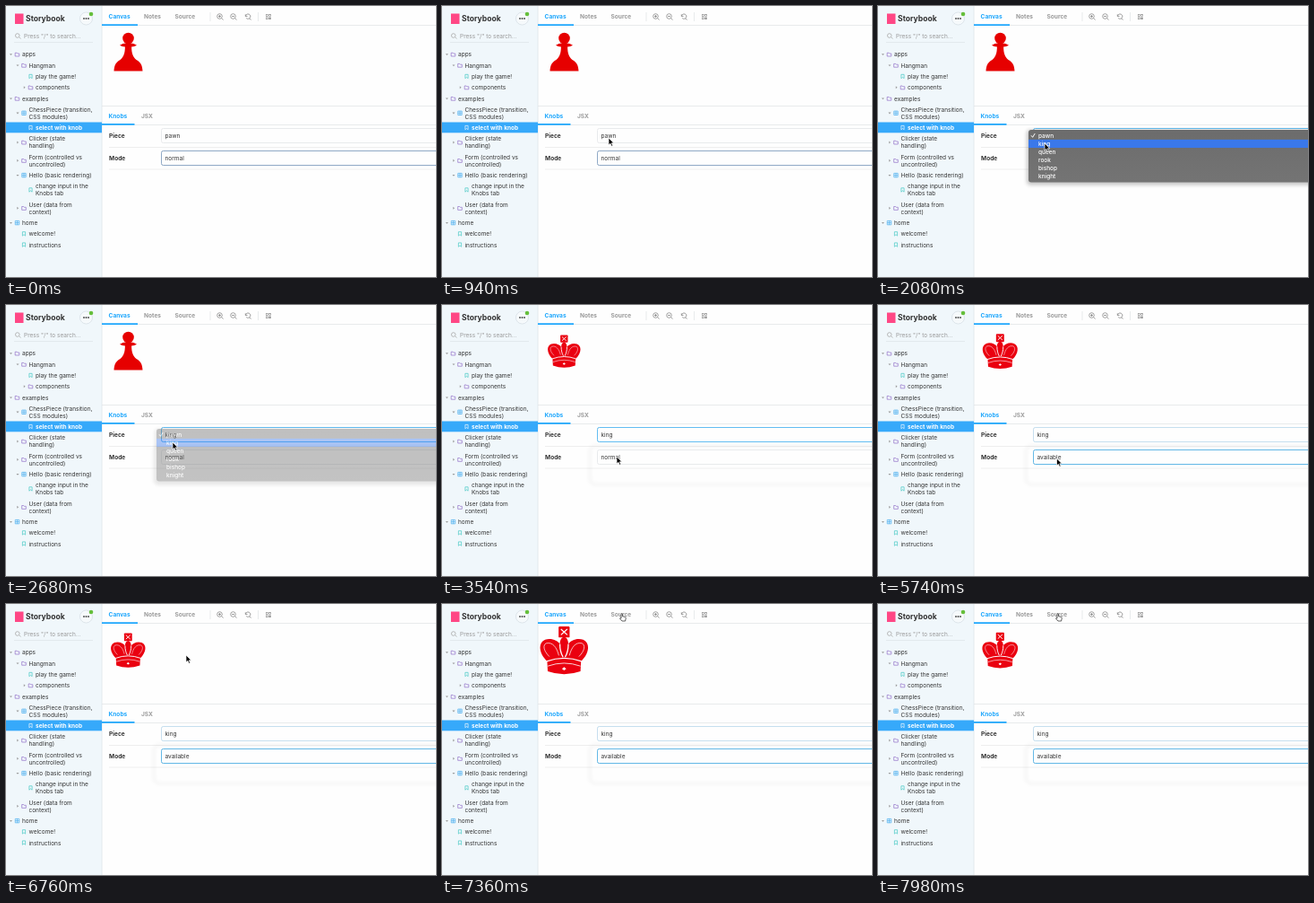
These frames come from a looping animation (480 by 302 pixels, 8 s). An HTML page:

```html
<!DOCTYPE html>
<html lang="en">
<head>
<meta charset="utf-8">
<title>Component explorer</title>
<style>
  html, body { margin: 0; width: 100%; height: 100%; overflow: hidden; background: #fefefe; }
  svg { display: block; width: 480px; height: 302px; font: 6.6px Inter, sans-serif; fill: #333; }
  .b { font-weight: 700; }
  .line { fill: none; stroke-width: .8; }
  .tab { fill: #999; font-weight: 700; }
  .on { fill: #1ea7fd; }
  .field { fill: none; stroke-width: 1; }
  .menu { font-size: 6.5px; font-weight: 500; fill: #fff; }
  #tree { font-size: 6.5px; }
</style>
</head>
<body>
<svg id="stage" viewBox="0 0 480 302">
  <defs>
    <filter id="blur" x="-10%" y="-40%" width="120%" height="180%"><feGaussianBlur stdDeviation="2"/></filter>
    <linearGradient id="dark" x2="0" y2="1"><stop stop-color="#6c6c6c"/><stop offset="1" stop-color="#747474"/></linearGradient>
  </defs>

  <rect width="107" height="302" fill="#f0f7fb"/>
  <path class="line" stroke="#dde5ea" d="M107 0V302"/>
  <rect x="10" y="8.5" width="9.5" height="11.5" fill="#ff4785"/>
  <text class="b" x="22" y="17" font-size="8.6">Storybook</text>
  <circle cx="89.5" cy="14" r="7" fill="#f6fafc" stroke="#d3dce2" stroke-width=".7"/>
  <g fill="#444"><circle cx="87" cy="14" r=".9"/><circle cx="89.5" cy="14" r=".9"/><circle cx="92" cy="14" r=".9"/></g>
  <circle cx="95" cy="9" r="2.3" fill="#66bf3c"/>
  <path class="line" stroke="#aaa" d="M14.8 34.8l1.7 1.7M15.1 33a2.3 2.3 0 1 1-4.6 0a2.3 2.3 0 1 1 4.6 0"/>
  <text x="20" y="36" font-size="6.5" fill="#999">Press "/" to search...</text>
  <path class="line" stroke="#dfe6ea" d="M9 40.5H97"/>
  <rect y="129.500" width="107" height="11.800" fill="#36a9fa"/>
  <g id="tree"></g>

  <path class="line" stroke="#e3e6e8" d="M107 21.5H480M107 111.5H480M107 132.5H480M228 7V17M281.500 7V17"/>
  <path fill="#1ea7fd" d="M107 20.300h40v1.700h-40zM107 131h36.500v1.700h-36.500z"/>
  <text class="tab on" x="114.500" y="14.400">Canvas</text>
  <text class="tab" x="154" y="14.400">Notes</text>
  <text class="tab" x="188.500" y="14.400">Source</text>
  <text class="tab on" x="114.500" y="124.900">Knobs</text>
  <text class="tab" x="151" y="124.900">JSX</text>
  <g id="tools" class="line" stroke="#888"></g>

  <path class="line" stroke="#eaeaea" d="M115 157.500H480M115 182H480"/>
  <text class="b" x="115" y="147.300">Piece</text>
  <text class="b" x="115" y="172.300">Mode</text>
  <g class="field" stroke="#e8eaec">
    <rect x="173.500" y="136.500" width="330" height="16" rx="2"/>
    <rect x="173.500" y="161.500" width="330" height="16" rx="2"/>
  </g>
  <rect id="pieceRing" class="field" stroke="#62bdf2" x="173.500" y="136.500" width="330" height="16" rx="2"/>
  <rect id="modeRing" class="field" x="173.500" y="161.500" width="330" height="16" rx="2"/>
  <text id="pieceValue" x="177.500" y="147.300" font-size="6.500"></text>
  <text id="modeValue" x="177.500" y="172.300" font-size="6.500"></text>
  <rect id="shade" class="line" stroke="#000" style="stroke-width:3" x="165" y="157" width="340" height="43" rx="6" filter="url(#blur)"/>

  <g id="pawn" fill="#e60000" transform="translate(136.500 51.500)">
    <circle cy="-15.500" r="6.300"/>
    <path d="M-9.500-7.800Q-6-10-3-10H3Q6-10 9.500-7.800Q7-6 3.600-6C3.700 1 5 5 9 8.500C14 11.500 15.500 14 16 21H-16C-15.500 14-14 11.500-9 8.500C-5 5-3.700 1-3.600-6Q-7-6-9.500-7.800Z"/>
  </g>
  <g id="king" fill="#ea0010">
    <rect x="-5.200" y="-22.500" width="10.400" height="10.500" rx="1"/>
    <path d="M-16 10.500C-24 3-25-7-18-10C-12-12-6-9-4-6C-4-10-2-12.500 0-12.500S4-10 4-6C6-9 12-12 18-10C25-7 24 3 16 10.500L15.500 20Q0 25.500 -15.500 20Z"/>
    <g class="line" stroke="#fff" style="stroke-width:1.100">
      <path d="M-3-20L3-14.500M3-20L-3-14.500"/>
      <path d="M-4-6C-4-1-3 3-1 6.500M4-6C4-1 3 3 1 6.500M-16.500 10.500Q0 4.500 16.500 10.500"/>
      <path d="M-15.500 15Q0 9.500 15.500 15" style="stroke-width:.7"/>
      <path d="M-14 6C-20 0-20-5-17-6.500C-11-8-7-3-5 5M14 6C20 0 20-5 17-6.500C11-8 7-3 5 5" style="stroke-width:.6"/>
    </g>
    <path fill="#fff" d="M-2 17.500L0 16L2 17.500L0 19Z"/>
  </g>

  <g id="pieceMenu" class="menu"></g>
  <g id="modeMenu" class="menu"></g>

  <g id="cursor" stroke="#fff" stroke-width=".7" fill="#000">
    <path id="arrow" d="M0 0V8L1.900 6.300L3.200 9.200L4.600 8.600L3.300 5.800H5.800Z"/>
    <path id="hand" fill="#fff" stroke="#222" d="M1 4.500V.700Q1.800-.300 2.500 .700V3.200L5.600 4Q6.400 4.500 6.200 5.500L5.600 8.500H2L-.600 5.500Q-.300 4.300 1 5.500Z"/>
  </g>
</svg>

<script>
const $ = id => document.getElementById(id);

// Sidebar: [y, indent level, icon, arrow, lines]
const icons = {
  folder: ['#8a63c4', 'M-2.3-1.8H-.4L.3-1H2.300V2H-2.300Z'],
  part: ['#38a8ee', 'M-2.200-2.200H2.200V2.200H-2.200ZM0-2.200V2.200M-2.200 0H2.200'],
  story: ['#37c5c0', 'M-1.600-2.200H1.600V2.200L0 .800L-1.600 2.200Z']
};
const arrows = { open: 'M-1.500-.700H1.500L0 1.100Z', shut: 'M-.700-1.500V1.500L1.100 0Z', none: '' };
const rows = [
  [54, 0, 'folder', 'open', ['apps']],
  [66.2, 1, 'folder', 'open', ['Hangman']],
  [78.5, 2, 'story', 'none', ['play the game!']],
  [90.8, 2, 'folder', 'shut', ['components']],
  [103.2, 0, 'folder', 'open', ['examples']],
  [119.3, 1, 'part', 'open', ['ChessPiece (transition,', 'CSS modules)']],
  [135.6, 2, 'story', 'none', ['select with knob']],
  [152, 1, 'folder', 'shut', ['Clicker (state', 'handling)']],
  [172.3, 1, 'folder', 'shut', ['Form (controlled vs', 'uncontrolled)']],
  [188.6, 1, 'part', 'open', ['Hello (basic rendering)']],
  [205, 2, 'story', 'none', ['change input in the', 'Knobs tab']],
  [225.3, 1, 'folder', 'shut', ['User (data from', 'context)']],
  [241.6, 0, 'part', 'open', ['home']],
  [253.9, 1, 'story', 'none', ['welcome!']],
  [266.1, 1, 'story', 'none', ['instructions']]
];
$('tree').innerHTML = rows.map(([y, level, icon, arrow, lines]) => {
  const x = 18 + level * 7.5, chosen = lines[0].startsWith('select');
  const [color, shape] = icons[icon];
  const text = lines.map((s, i) =>
    `<text x="${x}" y="${y + 2.4 + (i - (lines.length - 1) / 2) * 8}" ${chosen ? 'class="b" fill="#fff"' : ''}>${s}</text>`).join('');
  return `<path class="line" stroke="${chosen ? '#fff' : color}" style="stroke-width:.65" transform="translate(${x - 5.500} ${y})" d="${shape}"/>
    <path fill="#999" transform="translate(${x - 12.500} ${y})" d="${arrows[arrow]}"/>${text}`;
}).join('');

const lens = (x, sign) => `<circle cx="${x}" cy="11.500" r="2.800"/><path d="M${x + 2} 13.500l2 2${sign}"/>`;
$('tools').innerHTML =
  lens(238.500, 'M237 11.500h3m-1.500-1.500v3') + lens(253.500, 'M252 11.500h3') +
  '<path d="M267.300 9.300v2.200h2.200M267.500 11.200a2.700 2.700 0 1 1 .700 2.300M271.500 13.500l2 2"/>' +
  [290.5, 293.8].map(x => [9.5, 12.8].map(y => `<rect x="${x}" y="${y}" width="1.900" height="1.900" stroke-width=".6"/>`).join('')).join('');

function buildMenu(id, top, height, items) {
  const mid = i => top + 6.300 + i * 9.150;
  $(id).innerHTML = `
    <rect x="166" y="${top}" width="340" height="${height + 3}" rx="4" fill="#000" opacity=".22" filter="url(#blur)"/>
    <rect x="168" y="${top}" width="340" height="${height}" rx="3" fill="url(#dark)"/>
    <rect class="mark" x="168" width="340" height="9.200" fill="#3a78ea"/>
    <path class="line" stroke="#fff" style="stroke-width:1" d="M171 ${mid(0)}l1.600 2l2.600-4.200"/>` +
    items.map((s, i) => `<text x="179" y="${mid(i) + 2.200}">${s}</text>`).join('');
  const mark = $(id).querySelector('.mark');
  return (opacity, index) => {
    $(id).setAttribute('opacity', opacity);
    mark.setAttribute('y', mid(Math.max(index, 0)) - 4.600);
    mark.setAttribute('opacity', index < 0 ? 0 : 1);
  };
}
const showPieceMenu = buildMenu('pieceMenu', 138, 58.5, ['pawn', 'king', 'queen', 'rook', 'bishop', 'knight']);
const showModeMenu = buildMenu('modeMenu', 162.5, 31.5, ['normal', 'available', 'selected']);

// Cursor: [time, x, y]
const path = [
  [240, 434, 269], [560, 250, 205], [700, 158, 180], [940, 186, 147], [1820, 186, 147], [2060, 186, 153],
  [3040, 186, 153], [3460, 195, 169], [4240, 195, 169], [4500, 196, 178], [4800, 196, 178], [5200, 199.5, 171],
  [5900, 199.5, 171], [6400, 200.5, 72], [6560, 201, 57], [6800, 201, 57], [7160, 199, 10.5], [8000, 199, 10.5]
];
const ramp = (t, a, b) => Math.min(1, Math.max(0, (t - a) / (b - a)));
const smooth = u => u * u * (3 - 2 * u);
const show = (id, opacity) => $(id).setAttribute('opacity', +opacity);

function cursorAt(t) {
  const i = Math.max(1, path.findIndex(p => p[0] > t));
  const [t0, x0, y0] = path[i - 1], [t1, x1, y1] = path[i];
  const u = smooth(ramp(t, t0, t1));
  return [x0 + (x1 - x0) * u, y0 + (y1 - y0) * u];
}

// A menu opens, the hover moves down one item, the choice blinks, the menu fades.
function menuState(t, open, hover, blink, fade) {
  const index = t >= blink && t < blink + 60 ? -1 : +(t >= hover);
  return [t < open ? 0 : 1 - ramp(t, fade, fade + 280), index];
}

function draw(t) {
  showPieceMenu(...menuState(t, 1140, 1930, 2360, 2520));
  showModeMenu(...menuState(t, 3760, 4380, 4740, 4920));
  $('pieceValue').textContent = t < 2520 ? 'pawn' : 'king';
  $('modeValue').textContent = t < 4920 ? 'normal' : 'available';

  show('pieceRing', t < 1140 ? 0 : 1 - .75 * ramp(t, 3860, 4000));
  show('modeRing', t < 1140 ? 1 : ramp(t, 4920, 5200));
  $('modeRing').setAttribute('stroke', t < 1140 ? '#8fa9c6' : '#62b8e6');
  show('shade', t < 2520 ? 0 : .04);

  const grow = 1 - (1 - ramp(t, 3040, 3940)) ** 2;
  const pulse = t < 5600 ? 1 : 1 - .18 * Math.sin((t - 5600) / 1000 * 2 * Math.PI);
  show('pawn', t < 3040);
  $('king').setAttribute('transform', `translate(136.300 51.500) scale(${grow * pulse})`);

  const [x, y] = cursorAt(t);
  $('cursor').setAttribute('transform', `translate(${x} ${y})`);
  show('cursor', t >= 240);
  show('arrow', y >= 20);
  show('hand', y < 20);
}

const start = performance.now();
(function tick() {
  draw((performance.now() - start) % 8000);
  requestAnimationFrame(tick);
})();
</script>
</body>
</html>
```
